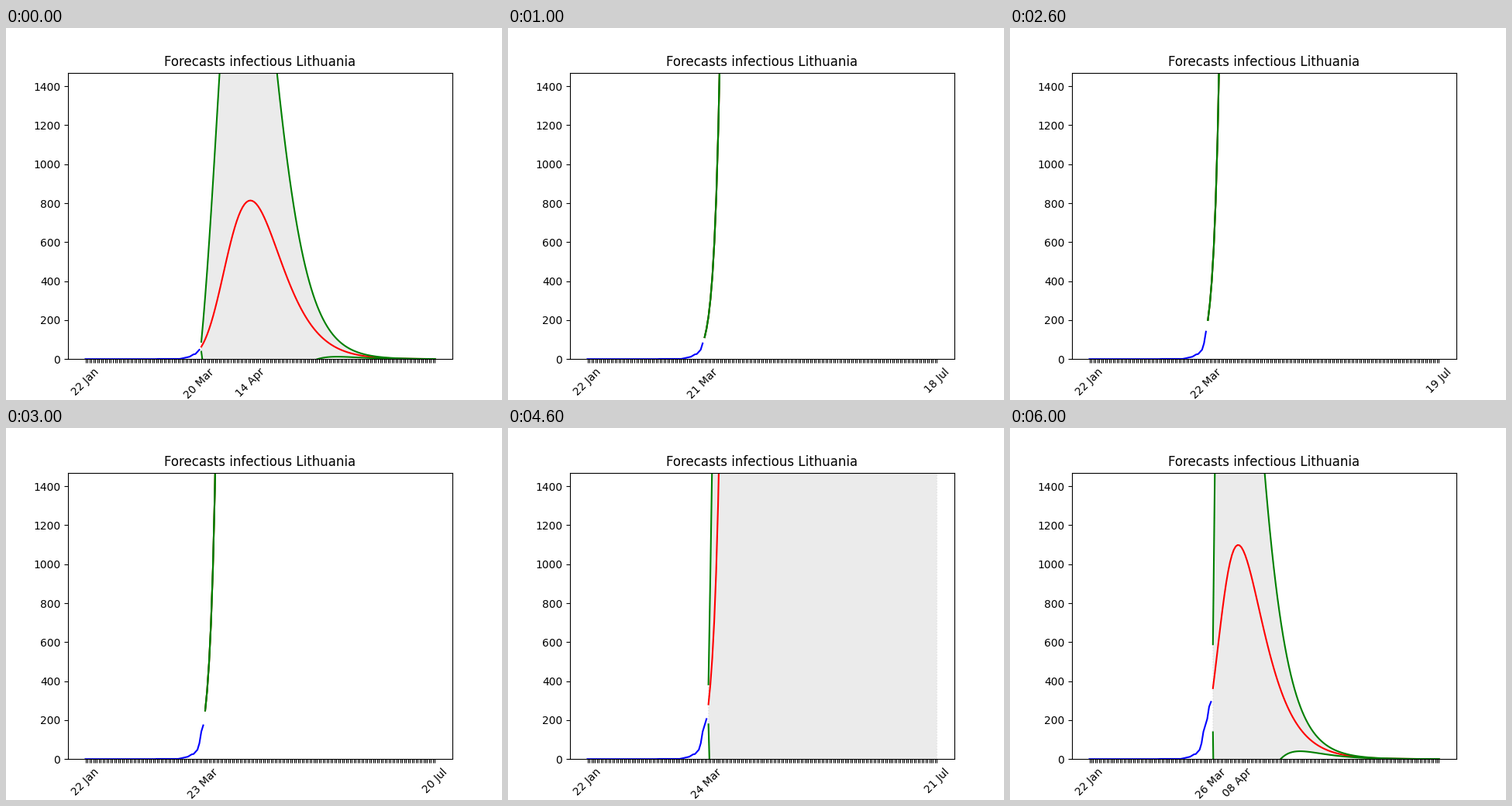
Recreate the animation shown at these times as a matplotlib script. Size 640 by 480 pixels, loop 7000 ms.

```python
import numpy as np
import matplotlib.pyplot as plt
from matplotlib.animation import FuncAnimation

FIRST_DAY = np.datetime64("2020-01-22")
MONTHS = "Jan Feb Mar Apr May Jun Jul".split()
HORIZON = 120      # forecast length in days
KNOWN = 59         # days observed before the first forecast
LIMIT = 1e5        # keeps runaway forecasts drawable

t = np.arange(HORIZON)

# Observed cases: straight runs between a few key days
key_days = [36, 37, 48, 49, 53, 55, 56, 58, 59, 60, 62, 63, 64]
key_cases = [0, 1, 1, 3, 12, 24, 26, 48, 81, 141, 206, 269, 294]
observed = np.interp(np.arange(65), key_days, key_cases)


def wave(top, peak, decay, bend):
    """Epidemic wave whose growth rate falls off exponentially."""
    u = t - peak
    return top * np.exp(-decay * u - decay / bend * (np.exp(-bend * u) - 1))


def growth(start, rate):
    return start * np.exp(rate * t)


def spread(start, level, rise, fade):
    """Relative half width: quick rise towards a slowly fading level."""
    return (level - (level - start) * np.exp(-t / rise)) * np.exp(-fade * t)


# (mean curve, relative half width of the interval)
forecasts = [
    (wave(814, 25, 0.1, 0.051), spread(0.4, 4.07, 2.8, 0.0237)),
    (growth(112, 0.3357), 0),
    (growth(200, 0.3487), 0),
    (growth(249, 0.3415), 0),
    (growth(281, 0.306), spread(0.364, 2.5, 1.35, 0)),
    (wave(7800, 30, 0.1, 0.0427), spread(0.79, 4.48, 1.09, 0.0148)),
    (wave(1099, 13.3, 0.088, 0.091), spread(0.62, 2.81, 0.6, 0.029)),
]


def date_label(day):
    _, month, number = str(FIRST_DAY + day).split("-")
    return f"{number} {MONTHS[int(month) - 1]}"


fig, ax = plt.subplots(figsize=(6.4, 4.8), dpi=100)


def draw(i):
    ax.clear()
    mean, width = forecasts[i]
    count = KNOWN + i
    total = count + HORIZON
    days = count + t
    low, mid, high = (np.clip(mean * (1 + side * width), -LIMIT, LIMIT)
                      for side in (-1, 0, 1))

    ax.fill_between(days, low, high, color="black", alpha=0.08, linestyle=":")
    ax.plot(np.arange(count), observed[:count], color="blue")
    ax.plot(days, mid, color="red")
    ax.plot(days, low, color="green")
    ax.plot(days, high, color="green")

    # The peak's label carries the date of the day before its tick
    peak = count + np.argmax(mean)
    labels = [""] * total
    labels[0] = date_label(0)
    labels[count - 1] = date_label(count - 1)
    labels[peak] = date_label(peak - 1)
    ax.set_xticks(range(total), labels, rotation=45)

    margin = 0.05 * (total - 1)
    ax.set_xlim(-margin, total - 1 + margin)
    ax.set_ylim(0, 1470)
    ax.set_title("Forecasts infectious Lithuania")
    return []


anim = FuncAnimation(fig, draw, frames=len(forecasts), interval=1000,
                     repeat=True, repeat_delay=0)
plt.show()
```
